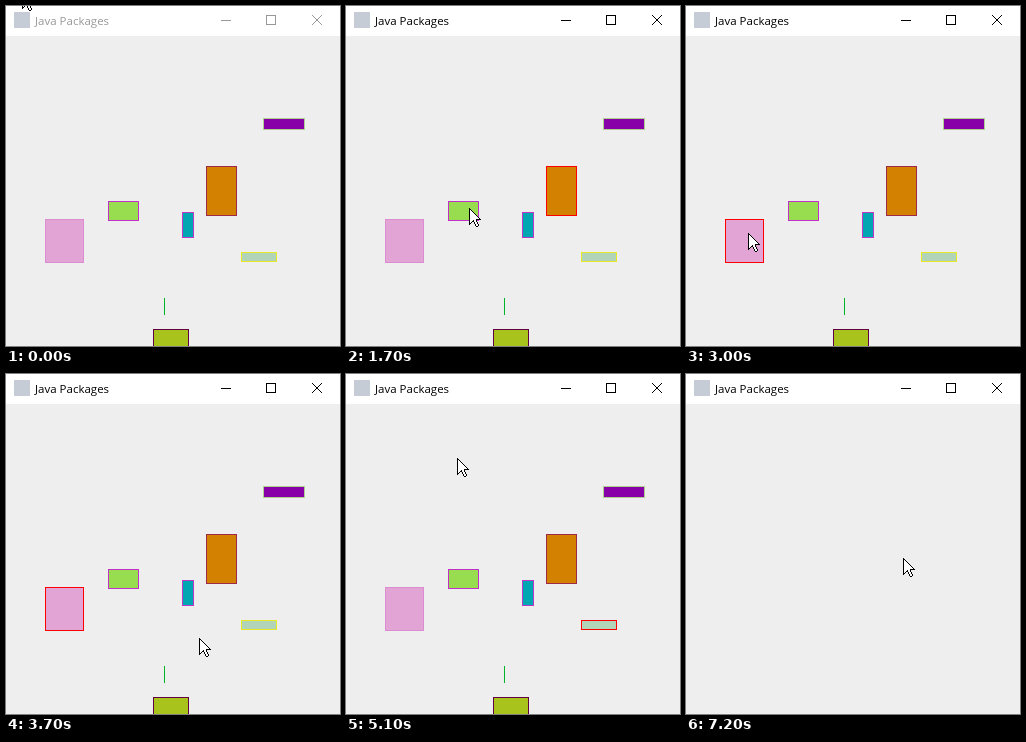
An HTML page with a canvas that plays this animation: 334 by 340 pixels, repeating every 7300 ms.

```html
<!DOCTYPE html>
<html lang="en">
<head>
<meta charset="utf-8">
<title>Java Packages</title>
<style>
  html, body { margin: 0; width: 100%; height: 100%; overflow: hidden; background: #eee; }
  canvas { display: block; }
</style>
</head>
<body>
<canvas id="stage" width="334" height="340"></canvas>
<script>
const ctx = document.getElementById('stage').getContext('2d');
const STEP_MS = 100, LOOP_STEPS = 73;

const box = (x, y, w, h, body, border) => ({ x, y, w, h, body, border });
const boxes = [
  box(257, 112, 42, 12, '#8800a8', '#b0d090'),
  box(200, 160, 31, 50, '#d28200', '#a02848'),
  box(102, 195, 31, 20, '#98dc50', '#c030c8'),
  box(176, 206, 12, 26, '#00a6b2', '#b838c8'),
  box(39, 213, 39, 44, '#e2a4d4', '#dc8cd0'),
  box(235, 246, 36, 10, '#b2d4b8', '#e8e828'),
  box(158, 292, 1, 17, '#00b428', '#00b428'),
  box(147, 323, 36, 24, '#a8c41c', '#600040')
];

// Pointer moves: first step, last step, x, y. It rests in between.
const origin = [16, -14];
const moves = [
  [0, 10, 215, 189], [16, 18, 72, 209], [19, 22, 120, 207], [24, 28, 62, 227],
  [31, 34, 143, 275], [35, 41, 253, 251], [45, 51, 111, 84],
  [52, 55, 150, 39], [55, 60, 214, 188], [67, 69, 217, 184]
];

// A click blanks the panel for one step, then marks the box under the pointer.
const clicks = [12, 23, 29, 42, 72];

function pointerAt(step) {
  let [x, y] = origin;
  for (const [from, to, toX, toY] of moves) {
    if (step <= from) break;
    const k = 1 - (1 - Math.min(1, (step - from) / (to - from))) ** 1.5;
    x += (toX - x) * k;
    y += (toY - y) * k;
  }
  return [Math.round(x), Math.round(y)];
}

function boxUnder([px, py]) {
  return boxes.find(({ x, y, w, h }) => px >= x && px < x + w && py >= y && py < y + h);
}

function fill(color, x, y, w, h) {
  ctx.fillStyle = color;
  ctx.fillRect(x, y, w, h);
}

function drawTitleBar(active) {
  const ink = active ? '#000' : '#999';
  fill('#fff', 0, 0, 334, 30);
  fill('#c5ccd5', 8, 6, 16, 16);
  ctx.fillStyle = ctx.strokeStyle = ink;
  ctx.font = '11.5px "Open Sans", "Noto Sans", sans-serif';
  ctx.fillText('Java Packages', 29, 19);
  ctx.fillRect(215, 14, 10, 1);
  ctx.strokeRect(260.5, 9.5, 9, 9);
  ctx.beginPath();
  ctx.moveTo(306, 9);
  ctx.lineTo(316, 19);
  ctx.moveTo(316, 9);
  ctx.lineTo(306, 19);
  ctx.stroke();
}

function drawBox({ x, y, w, h, body, border }, selected) {
  fill(selected ? '#f00' : border, x, y, w, h);
  if (w > 2) fill(body, x + 1, y + 1, w - 2, h - 2);
}

// Built row by row so its edges stay crisp.
function drawPointer(x, y) {
  const span = (row, left, right) => {
    fill('#000', x + left, y + row, right - left + 1, 1);
    if (right - left > 1) fill('#fff', x + left + 1, y + row, right - left - 1, 1);
  };
  for (let row = 0; row < 11; row++) span(row, 0, row);
  span(11, 0, 7);
  fill('#000', x + 8, y + 11, 4, 1);
  for (let row = 12; row < 18; row++) {
    const tail = Math.floor(row / 2) - 2;
    if (row < 17) span(row, 0, 16 - row);
    span(row, tail, tail + 3);
  }
  span(18, 7, 8);
}

function render(time) {
  const step = Math.floor(time / STEP_MS) % LOOP_STEPS;
  const click = clicks.filter(at => at <= step).pop();
  const selected = click && boxUnder(pointerAt(click));
  fill('#eee', 0, 0, 334, 340);
  drawTitleBar(step >= clicks[0]);
  if (step !== click) boxes.forEach(b => drawBox(b, b === selected));
  drawPointer(...pointerAt(step));
}

const start = performance.now();
function tick() {
  render(performance.now() - start);
  requestAnimationFrame(tick);
}
tick();
</script>
</body>
</html>
```
